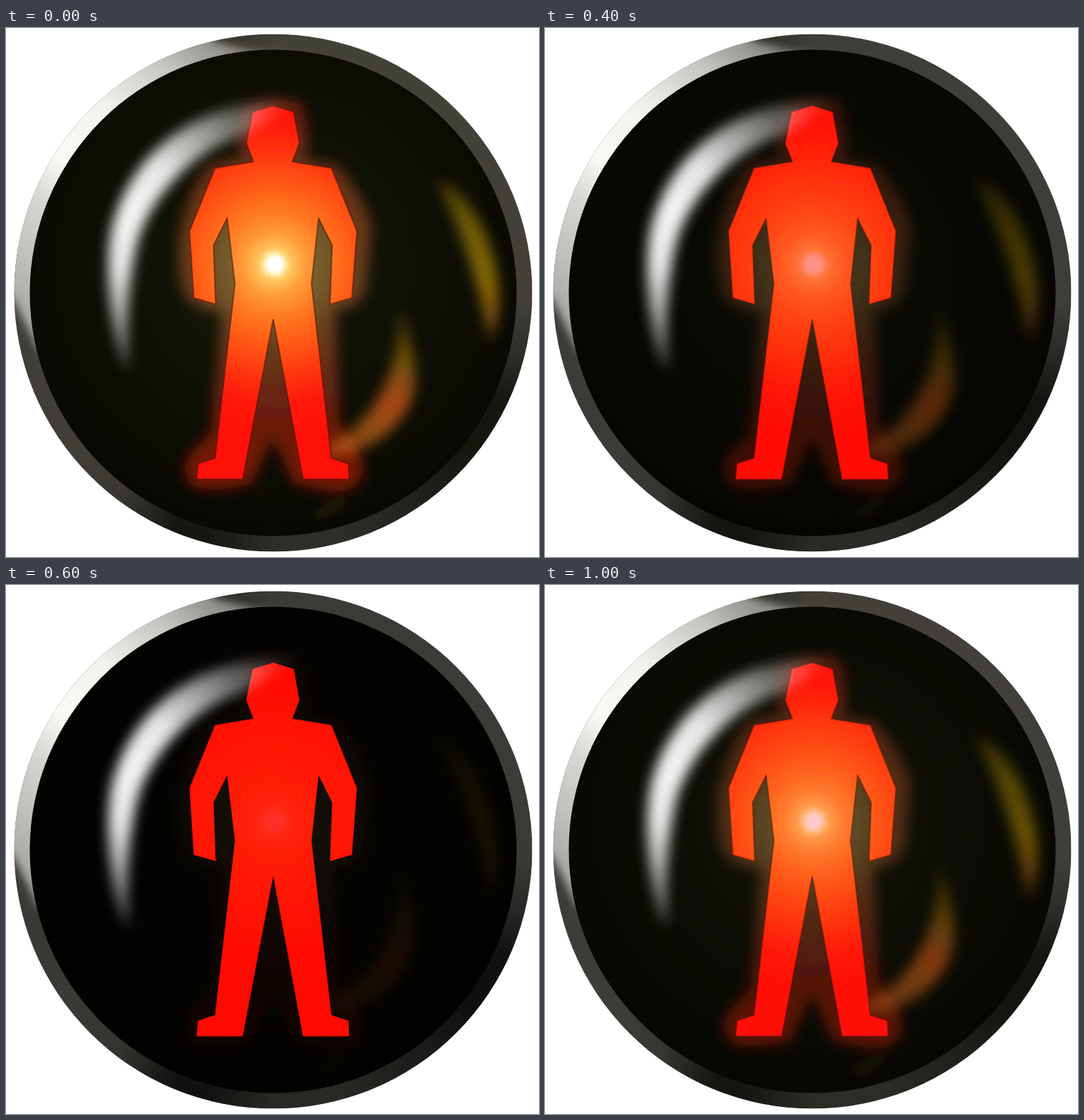
An HTML page for the animation above (1200 ms loop, 751 px wide and 746 px high).

```html
<!DOCTYPE html>
<html lang="en">
<head>
<meta charset="utf-8">
<title>Red signal lamp</title>
<style>
  html, body { margin: 0; width: 100%; height: 100%; overflow: hidden; background: #fff; }
  svg { display: block; width: 751px; height: 746px; }
  .rim {
    width: 730px; height: 730px; border-radius: 50%;
    background: conic-gradient(#3b3936 0deg, #3a3836 92deg, #262524 104deg, #0e0e0d 115deg,
      #0d0d0c 128deg, #1a1a19 145deg, #272624 165deg, #272624 180deg, #0e0e0d 196deg,
      #10100f 203deg, #32302e 217deg, #393735 230deg, #393735 330deg,
      #2a2927 348deg, #343230 356deg, #3b3936 360deg);
  }
  .screen { mix-blend-mode: screen; }
</style>
</head>
<body>
<svg viewBox="-.5 -.5 751 746" xmlns="http://www.w3.org/2000/svg">
  <defs>
    <path id="man" d="M347 118 376 109 405 118 413 162 403 188 458 197 494 286 487 380 456 389
      459 306 440 268 430 360 458 606 482 614 483 636 418 636 376 410 333 636 268 636 270 614
      294 606 322 360 311 268 292 306 295 389 264 380 258 286 294 197 348 188 338 162Z"/>
    <clipPath id="inMan"><use href="#man"/></clipPath>
    <clipPath id="inDisc"><circle cx="376" cy="373" r="365"/></clipPath>
    <filter id="soft" x="-30%" y="-30%" width="160%" height="160%"><feGaussianBlur stdDeviation="9"/></filter>
    <filter id="edge" x="-20%" y="-20%" width="140%" height="140%"><feGaussianBlur stdDeviation="6"/></filter>
    <filter id="spark" x="-50%" y="-50%" width="200%" height="200%"><feGaussianBlur stdDeviation="2"/></filter>
    <linearGradient id="shine" gradientUnits="userSpaceOnUse" x1="15" y1="400" x2="350" y2="15">
      <stop offset="0" stop-color="#a4a4a1"/><stop offset=".15" stop-color="#c2c2be"/>
      <stop offset=".28" stop-color="#d6d6d2"/><stop offset=".4" stop-color="#fafaf5"/>
      <stop offset=".58" stop-color="#f3f3ee"/><stop offset=".78" stop-color="#c4c3bf"/>
      <stop offset="1" stop-color="#6c6a67"/>
    </linearGradient>
    <radialGradient id="gloss" gradientUnits="userSpaceOnUse" cx="166" cy="258" r="270">
      <stop offset="0" stop-color="#fff" stop-opacity=".96"/>
      <stop offset=".3" stop-color="#fff" stop-opacity=".9"/>
      <stop offset=".5" stop-color="#fff" stop-opacity=".68"/>
      <stop offset=".7" stop-color="#fff" stop-opacity=".44"/>
      <stop offset=".88" stop-color="#fff" stop-opacity=".22"/>
      <stop offset="1" stop-color="#fff" stop-opacity=".08"/>
    </radialGradient>
    <radialGradient id="haze" gradientUnits="userSpaceOnUse" cx="378" cy="333" r="400">
      <stop offset="0" stop-color="#1c1d0c"/><stop offset=".45" stop-color="#101107"/>
      <stop offset=".8" stop-color="#0b0b04"/><stop offset="1" stop-color="#080803"/>
    </radialGradient>
    <radialGradient id="halo" gradientUnits="userSpaceOnUse" cx="378" cy="333" r="310">
      <stop offset="0" stop-color="#7c602a"/><stop offset=".22" stop-color="#684a24"/>
      <stop offset=".36" stop-color="#5c2c14"/><stop offset=".52" stop-color="#5c1c0c"/>
      <stop offset=".72" stop-color="#620c06"/><stop offset="1" stop-color="#700a05"/>
    </radialGradient>
    <radialGradient id="heat" gradientUnits="userSpaceOnUse" cx="378" cy="333" r="240">
      <stop offset="0" stop-color="#ffffe8"/><stop offset=".05" stop-color="#fff0a4"/>
      <stop offset=".1" stop-color="#ffc05c"/><stop offset=".18" stop-color="#ff9a3a"/>
      <stop offset=".3" stop-color="#ff7824"/><stop offset=".42" stop-color="#ff5f19"/>
      <stop offset=".55" stop-color="#ff4512"/><stop offset=".68" stop-color="#ff2a0e"/>
      <stop offset=".82" stop-color="#ff120b"/><stop offset="1" stop-color="#ff0808"/>
    </radialGradient>
    <linearGradient id="amber" gradientUnits="userSpaceOnUse" x1="620" y1="210" x2="690" y2="450">
      <stop offset="0" stop-color="#3c3002"/><stop offset=".3" stop-color="#665003"/>
      <stop offset=".6" stop-color="#7c5e04"/><stop offset=".82" stop-color="#7c4a08"/>
      <stop offset="1" stop-color="#3c1a04"/>
    </linearGradient>
    <linearGradient id="ember" gradientUnits="userSpaceOnUse" x1="560" y1="395" x2="470" y2="610">
      <stop offset="0" stop-color="#2c2002"/><stop offset=".3" stop-color="#6a4606"/>
      <stop offset=".55" stop-color="#a03c0c"/><stop offset=".75" stop-color="#8a420e"/>
      <stop offset="1" stop-color="#5c330a"/>
    </linearGradient>
  </defs>

  <foreignObject x="11" y="8" width="730" height="730"><div class="rim"></div></foreignObject>
  <g clip-path="url(#inDisc)">
    <path d="M-30 345 10 382 46 455 250 300 410 40 345 31 292 18 270 -10 -30 -10Z" fill="url(#shine)" filter="url(#edge)"/>
  </g>
  <circle cx="376" cy="373" r="343"/>
  <use href="#man" fill="#ff0800"/>

  <g class="lit screen">
    <circle cx="376" cy="373" r="365" fill="url(#haze)"/>
    <path class="screen" fill="url(#halo)" filter="url(#soft)" d="M338 112Q376 92 418 108L426 165 418 184
      465 192Q500 230 515 280L506 370Q490 400 463 396L470 560Q506 595 502 630Q490 658 455 653L405 642
      375 575 346 642Q300 655 264 647Q240 622 262 597L288 570 304 400Q265 398 250 375Q237 330 246 280
      Q260 220 288 190L330 182Q322 150 338 112Z"/>
    <g class="screen" filter="url(#soft)">
      <path d="M606 214C650 226 686 290 694 368Q696 412 680 444C674 395 652 305 606 214Z" fill="url(#amber)"/>
      <path d="M554 392C573 440 580 488 573 516C562 558 520 592 478 600Q455 604 430 600C500 574 558 505 554 392Z" fill="url(#ember)"/>
      <ellipse cx="457" cy="676" rx="30" ry="9" transform="rotate(-30 457 676)" fill="#140e02"/>
    </g>
    <g clip-path="url(#inMan)"><circle class="screen" cx="378" cy="333" r="340" fill="url(#heat)"/></g>
    <g id="rays" stroke="#fff" stroke-linecap="round"></g>
    <circle cx="378" cy="333" r="11" fill="#fff" filter="url(#spark)"/>
  </g>
  <use class="lit" href="#man" fill="none" stroke="#3c1200" stroke-width="1.3" stroke-opacity=".85"/>

  <path d="M170 482C148 440 138 350 147 290C165 205 226 132 330 109Q380 97 422 98C385 111 366 134 325 153C257 178 208 236 188 290C172 340 168 420 172 482Z"
    fill="url(#gloss)" filter="url(#soft)"/>
</svg>
<script>
  const rays = document.getElementById('rays');
  let seed = 11;
  const rand = () => (seed = seed * 16807 % 2147483647) / 2147483647;

  function addRay(angle, length, width, alpha) {
    const line = document.createElementNS('http://www.w3.org/2000/svg', 'line');
    const attrs = {
      x1: 378, y1: 333,
      x2: 378 + length * Math.cos(angle), y2: 333 + length * Math.sin(angle),
      'stroke-width': width, 'stroke-opacity': alpha
    };
    for (const key in attrs) line.setAttribute(key, attrs[key]);
    rays.append(line);
  }

  for (let i = 0; i < 44; i++) {
    const angle = (i + rand() * 0.6) * Math.PI / 22;
    addRay(angle, 13 + rand() * 6, 1.2, 0.5);
    addRay(angle, 18 + rand() * 14, 0.6, 0.15);
  }

  // Brightness of the lamp, one value per 200 ms step.
  const levels = [1, 0.78, 0.55, 0.16, 0.55, 0.78];
  const steps = [...levels, levels[0]].map((opacity, i) => ({
    opacity, offset: i / levels.length, easing: 'steps(1, end)'
  }));
  for (const el of document.querySelectorAll('.lit')) {
    el.animate(steps, { duration: 1200, iterations: Infinity });
  }
</script>
</body>
</html>
```
